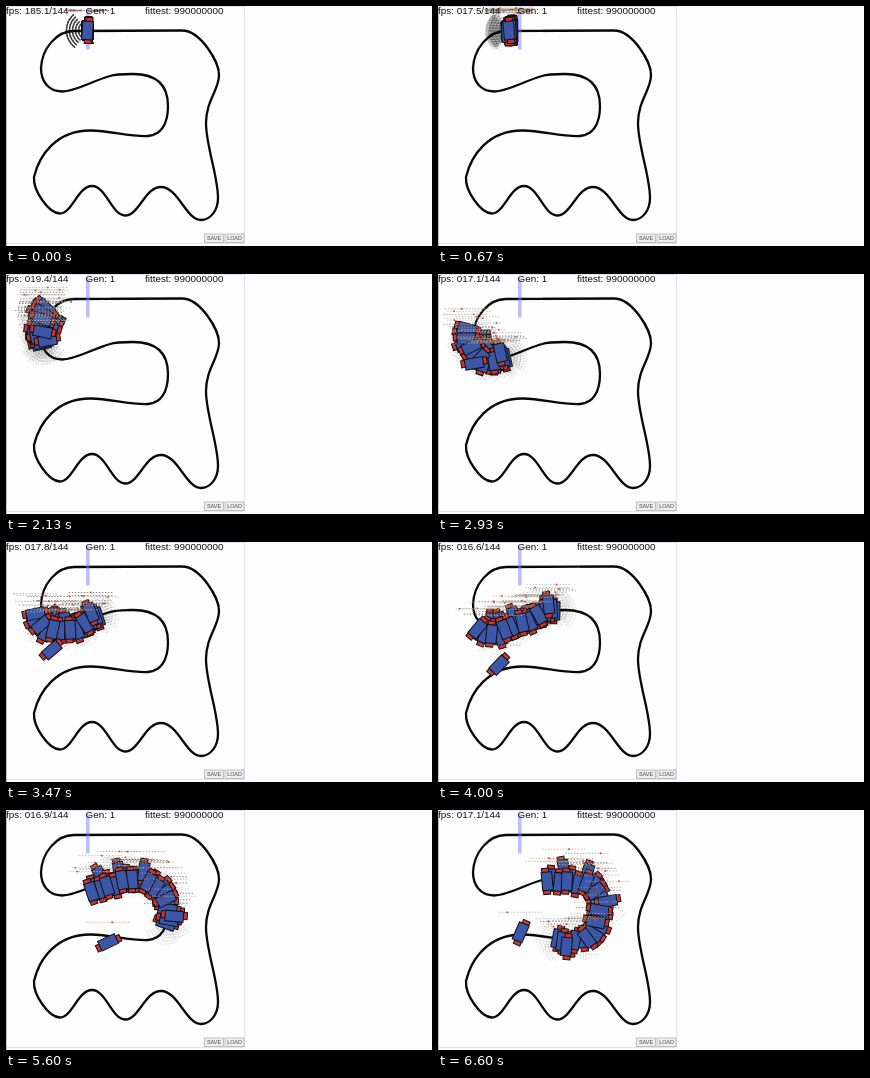
Animation of 426 by 240 pixels, one loop 6.67 s. Source, as an HTML page:

```html
<!DOCTYPE html>
<html lang="en">
<head>
<meta charset="utf-8">
<title>Line followers</title>
<style>
  html, body { margin: 0; width: 100%; height: 100%; overflow: hidden; background: #fdfdfd; }
  svg { display: block; width: 100vw; height: 100vh; }
  text { font-family: "Liberation Sans", Arial, sans-serif; font-size: 9.9px; fill: #111; white-space: pre; }
  .button rect { fill: #efefef; stroke: #a5a5a5; stroke-width: .7; }
  .button text { font-size: 5.4px; fill: #444; text-anchor: middle; }
  .frame { fill: none; stroke: #e3e3f3; }
</style>
</head>
<body>
<svg viewBox="0 0 426 240">
  <defs>
    <g id="car" stroke="#111">
      <rect x="-4.6" y="-13" width="7" height="4.2" fill="#cf3430"/>
      <rect x="-4.6" y="8.8" width="7" height="4.2" fill="#cf3430"/>
      <rect x="-5.3" y="-9.2" width="10.6" height="18.4" fill="#3d57a8"/>
    </g>
    <g id="fan" fill="none" stroke="#222" stroke-opacity=".13" stroke-width="1.3" stroke-dasharray="1.3 1.5"></g>
  </defs>

  <rect class="frame" x=".5" y=".5" width="238" height="237"/>
  <path d="M.5 0V240" stroke="#c4c4c4"/>
  <path fill="none" stroke="#080808" stroke-width="2.3" d="M68 25L176 24.5C194 24.5 213 55 213 69
    C213 84 200 95 200 117C200 140 212 170 212 192C212 205 204 214 195 214
    C180 214 172 181 155 181C139 181 133 209.5 119 209.5C106 209.5 100 180 86 180
    C72 180 66 207.5 54 207.5C43 207.5 27 185 28 171C33 150 50 124 85 124.5
    C105 125 125 131 142 130C155 129 162 118 162 100C162 78 150 68 127 68
    C119 68 110 68 104 70C86 75 70 85.5 56 85.5C42 85 35 75 35 62C36 43 50 25 68 25Z"/>
  <path id="lap" fill="none" d="M81.5 24.5L68 25C50 25 36 43 35 62C35 75 42 85 56 85.5
    C70 85.5 86 75 104 70C110 68 119 68 127 68C150 68 162 78 162 100
    C162 118 155 129 142 130C125 131 105 125 85 124.5"/>
  <path id="detour" fill="none" d="M81.5 24.5C58 22 30 34 36 88C38 104 52 114 63 125
    C70 132 78 141 88.5 144.5C102 149 109 147 102 132C98 123 91 127 80 121"/>
  <rect x="80" y="4" width="3.6" height="39.5" fill="#8080ff" fill-opacity=".5"/>

  <g id="fans"></g>
  <g id="cars"></g>
  <g id="rows"></g>

  <text id="fps" x="0" y="8"></text>
  <text x="79.5" y="8">Gen: 1</text>
  <text x="139" y="8">fittest: 990000000</text>
  <g class="button"><rect x="198.5" y="228" width="19" height="8.5"/><text x="208" y="234.1">SAVE</text></g>
  <g class="button"><rect x="219" y="228" width="19" height="8.5"/><text x="228.5" y="234.1">LOAD</text></g>
</svg>
<script>
  const LOOP = 6.67, STEPS = 100, COUNT = 28;
  const $ = id => document.getElementById(id);
  const inks = ['#999', '#b5b5b5', '#c4b57c', '#666'];

  const hash = (a, b = 0) => {
    const v = Math.sin(a * 127.1 + b * 311.7 + 5.3) * 43758.5453;
    return v - Math.floor(v);
  };

  function make(parent, tag, attrs) {
    const el = document.createElementNS('http://www.w3.org/2000/svg', tag);
    for (const key in attrs) el.setAttribute(key, attrs[key]);
    return parent.appendChild(el);
  }

  for (let r = 9; r <= 21; r += 3) {
    const x = r * Math.cos(.9), y = r * Math.sin(.9);
    make($('fan'), 'path', { d: `M${x} ${-y}A${r} ${r} 0 0 1 ${x} ${y}` });
  }

  function makeCar(i, path, pace, loose) {
    const row = make($('rows'), 'g', { opacity: .8 });
    return {
      path, pace, loose, row,
      length: path.getTotalLength(),
      side: 9 * (2 * hash(i, 1) - 1) ** 3,
      turn: 26 * (hash(i, 2) - .5),
      fan: loose && make($('fans'), 'use', { href: '#fan', 'stroke-dashoffset': 3 * hash(i, 3) }),
      body: make($('cars'), 'use', { href: '#car' }),
      line: make(row, 'path', { d: 'M-22 0H22', 'stroke-dasharray': '1.4 1.6' }),
      dot: make(row, 'rect', { y: -.8, width: 1.8, height: 1.6, fill: '#b8232a' })
    };
  }

  // Golden-ratio spacing spreads the pack evenly between slowest and fastest
  const cars = Array.from({ length: COUNT }, (_, i) =>
    makeCar(i, $('lap'), 1 - .47 * (i * .618 % 1), 1));
  cars.push(makeCar(COUNT, $('detour'), .82, 0));

  // Speeds up from rest, then holds 49 px/s
  const travelled = t => 49 * (t - .6 * (1 - Math.exp(-t / .6)));

  function pose(car, t) {
    const s = Math.min(car.length - 3, car.pace * travelled(t));
    const p = car.path.getPointAtLength(s);
    const a = car.path.getPointAtLength(Math.max(0, s - 3));
    const b = car.path.getPointAtLength(s + 3);
    const angle = Math.atan2(b.y - a.y, b.x - a.x);
    const scatter = car.loose * Math.min(1, t / 2);
    const drift = 8 * car.loose * (1.1 - car.pace) * Math.sin(Math.PI * t / LOOP);
    const off = drift + car.side * scatter;
    return {
      x: p.x - Math.sin(angle) * off,
      y: p.y + Math.cos(angle) * off,
      angle: angle * 180 / Math.PI + car.turn * scatter
    };
  }

  function draw(n) {
    const t = n * LOOP / STEPS;
    const beat = Math.floor(n / 4);
    cars.forEach((car, i) => {
      const { x, y, angle } = pose(car, t);
      const place = `translate(${x} ${y}) rotate(${angle})`;
      car.body.setAttribute('transform', place);
      if (car.fan) car.fan.setAttribute('transform', place);
      car.row.setAttribute('transform', `translate(${x} ${y - 20})`);
      car.line.setAttribute('stroke', inks[Math.floor(hash(i, beat) * inks.length)]);
      car.dot.setAttribute('x', -20 + 40 * hash(i + 40, beat));
    });
    const rate = n ? 16.3 + 3.2 * hash(n, 9) : 185.1;
    $('fps').textContent = `fps: ${rate.toFixed(1).padStart(5, '0')}/144`;
  }

  let shown = -1;
  const start = performance.now();
  function tick(now) {
    const ms = Math.max(0, now - start) % (LOOP * 1000);
    const n = Math.min(STEPS - 1, Math.floor((ms + 5) / 66.6));
    if (n !== shown) draw(shown = n);
    requestAnimationFrame(tick);
  }
  draw(0);
  requestAnimationFrame(tick);
</script>
</body>
</html>
```
